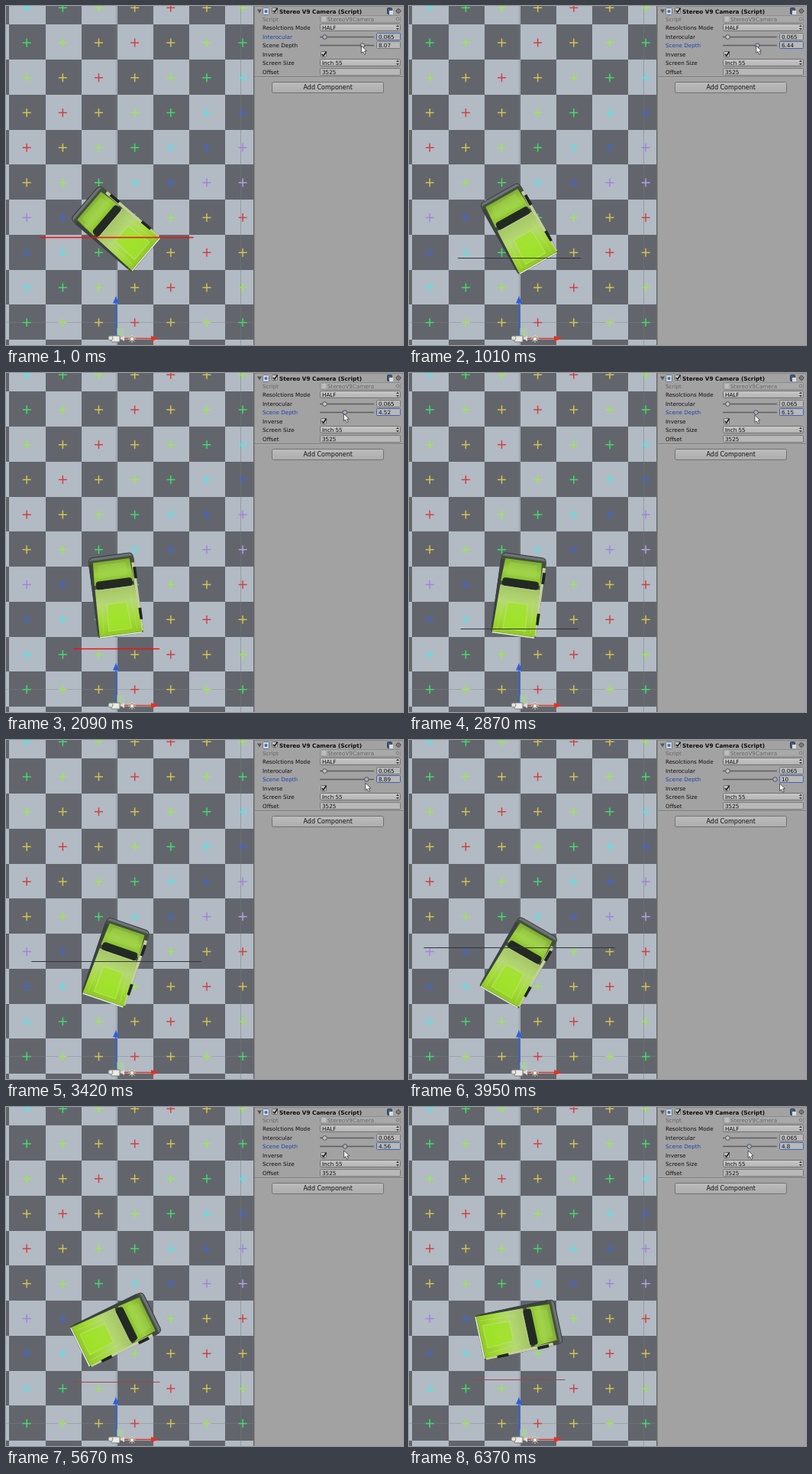
These frames come from a looping animation (520 px wide and 443 px high, 6430 ms). An HTML page with a canvas:

```html
<!DOCTYPE html>
<html lang="en">
<head>
<meta charset="utf-8">
<title>Stereo camera depth</title>
<style>
  html, body { margin: 0; width: 100%; height: 100%; overflow: hidden; background: #a2a2a2; }
  canvas { display: block; width: 520px; height: 443px; }
</style>
</head>
<body>
<canvas id="stage" width="520" height="443"></canvas>
<script>
const ctx = document.getElementById('stage').getContext('2d');
const LOOP = 6430;
const STEP = 77.68;
const FONT = '"DejaVu Sans", sans-serif';
const CROSS_COLORS = ['#d04040', '#d8c24e', '#9ae84e', '#42dc68', '#52e6e8', '#4264d2', '#a184dc', '#b4a0e6'];

// Smooth rise from 0 to 1 between two times.
function ramp(t, from, to) {
  const u = Math.min(1, Math.max(0, (t - from) / (to - from)));
  return u * u * (3 - 2 * u);
}

const depthAt = t => 8.07 - 3.55 * ramp(t, 570, 1500) + 5.48 * ramp(t, 2312, 3868)
  - 5.7 * ramp(t, 5000, 5770) + 0.5 * ramp(t, 6285, 6365);
const knobX = depth => 414.5 + 6.5 * depth;

function rect(x, y, w, h, fill) {
  ctx.fillStyle = fill;
  ctx.fillRect(x, y, w, h);
}

function line(x1, y1, x2, y2, color, width = 1) {
  ctx.strokeStyle = color;
  ctx.lineWidth = width;
  ctx.beginPath();
  ctx.moveTo(x1, y1);
  ctx.lineTo(x2, y2);
  ctx.stroke();
}

function poly(points, fill, stroke, width = 1) {
  ctx.beginPath();
  points.forEach(([x, y]) => ctx.lineTo(x, y));
  ctx.closePath();
  if (fill) { ctx.fillStyle = fill; ctx.fill(); }
  if (stroke) { ctx.strokeStyle = stroke; ctx.lineWidth = width; ctx.stroke(); }
}

// Symmetric panel between two cross sections, given as half widths.
function panel(y0, half0, y1, half1, fill, stroke) {
  poly([[-half0, y0], [half0, y0], [half1, y1], [-half1, y1]], fill, stroke);
}

function box(x, y, w, h, radius, fill, stroke) {
  ctx.beginPath();
  ctx.roundRect(x, y, w, h, radius);
  if (fill) { ctx.fillStyle = fill; ctx.fill(); }
  if (stroke) { ctx.strokeStyle = stroke; ctx.lineWidth = 1; ctx.stroke(); }
}

function disc(x, y, r, fill, stroke) {
  box(x - r, y - r, 2 * r, 2 * r, r, fill, stroke);
}

function text(str, x, y, color = '#111', size = 7.2, weight = '') {
  ctx.font = `${weight} ${size}px ${FONT}`;
  ctx.fillStyle = color;
  ctx.fillText(str, x, y);
}

function vertical(y0, y1, ...colors) {
  const g = ctx.createLinearGradient(0, y0, 0, y1);
  colors.forEach((c, i) => g.addColorStop(i / (colors.length - 1), c));
  return g;
}

function drawFloor() {
  const W = 47.15, H = 45.75;
  for (let row = -1; row < 10; row++) {
    for (let col = -1; col < 7; col++) {
      rect(Math.round(4.4 + col * W), Math.round(24.3 + row * H), 48, 46, (row + col) & 1 ? '#b2bac4' : '#62666c');
    }
  }
  line(144.5, 0, 144.5, 443, '#7e868c88');
  line(307.5, 0, 307.5, 443, '#757b8377');
  line(0, 413.5, 325, 413.5, '#7b838a66');
  for (let row = -1; row < 9; row++) {
    for (let col = 0; col < 7; col++) {
      const x = 27.2 + col * W, y = 48 + row * 45.7;
      const color = CROSS_COLORS[Math.abs(row + col - (row < 5 ? 3 : 11))];
      line(x - 5.5, y, x + 5.5, y, color, 1.5);
      line(x, y - 5.5, x, y + 5.5, color, 1.5);
    }
  }
}

function drawCar(t) {
  ctx.save();
  ctx.translate(143.8, 290.8);
  ctx.rotate((0.02 * t - 49.5) * Math.PI / 180);
  // tailgate and body shell
  box(-29, -53, 58, 14, 5, '#6b7377', '#33393c');
  box(-30, -49, 60, 102, 4, '#454f3c');
  // shaded side, then lit side with wheel arches
  rect(-30, -44, 4, 90, '#3a4140');
  rect(26, -40, 4, 90, '#c3cfa0');
  for (const y of [-34, 20]) rect(27, y, 4, 15, '#20261f');
  // cabin
  panel(-46, 24, -16, 26, vertical(-46, -16, '#7fae32', '#9cd23c', '#86be2c'));
  panel(-42, 18, -25, 20, '#a9d85a66');
  // hood
  panel(-11, 26, 51, 28, vertical(-11, 51, '#a5c466', '#b4d872', '#a4dc38', '#90ca22'));
  panel(10, 13, 45, 15, '#a0e42acc', '#c4e68aaa');
  for (const side of [-1, 1]) line(side * 19, 2, side * 22, 47, '#c0e08488');
  // windshield
  box(-24, -21, 48, 11, 4, '#232a24');
  line(-22, -9.5, 22, -9.5, '#b6cb8c');
  line(-28, 52, 28, 52, '#f0f5e8', 1.5);
  ctx.restore();
}

function drawDepthLine(t, depth) {
  const distance = 16.25 * depth, half = 0.77 * distance;
  const y = Math.round(433.5 - distance) + 0.5;
  const bright = t < 570 || (t > 1500 && t < 2312);
  const dim = t > 4950 ? '#a04446' : '#30343a';
  line(144.5 - half, y, 144.5 + half, y, bright ? '#ee1111' : dim, bright ? 1.4 : 1);
}

function drawGizmo() {
  rect(145, 421, 10, 10, '#a8d88a77');
  line(144, 434, 144, 388, '#2f62d8', 1.5);
  poly([[144, 379], [148, 388.5], [140, 388.5]], '#2e5fe0');
  line(144, 434.5, 191, 434.5, '#d83828', 1.5);
  poly([[201, 434.5], [190, 431], [190, 438]], '#e23322');
  box(138, 431, 11, 8, 1, '#ecebe2', '#77797a');
  poly([[149, 434], [155, 431], [155, 438]], '#dedfd8');
  disc(137, 434, 3, '#e4e4dc', '#8a8c8c');
  for (let i = 0; i < 4; i++) {
    const a = i * Math.PI / 4, dx = 5 * Math.cos(a), dy = 5 * Math.sin(a);
    line(165 - dx, 435 - dy, 165 + dx, 435 + dy, '#f3e9cf', 0.8);
  }
  disc(165, 435, 2.6, '#fff3dd', '#988c7c');
}

function check(x, y) {
  box(x + 0.5, y + 0.5, 7, 7, 1, '#c6c6c6', '#666');
  line(x + 2, y + 4, x + 3.7, y + 6.3, '#111', 1.5);
  line(x + 3.7, y + 6.3, x + 7.5, y + 0.5, '#111', 1.5);
}

function popup(label, y) {
  box(411.5, y + 0.5, 105, 9, 2, vertical(y, y + 9, '#c9c9c9', '#b4b4b4'), '#707070');
  text(label, 414, y + 7.7);
  for (const side of [-1, 1]) {
    poly([[511, y + 5 + side], [515, y + 5 + side], [513, y + 5 + side * 3.3]], '#333');
  }
}

function field(label, x, y, w, focused) {
  box(x + 0.5, y + 0.5, w - 1, 9, 1, '#b8b8b8', focused ? '#3f63b4' : '#777');
  text(label, x + 3, y + 7.8);
}

function slider(label, y, x, value, focused) {
  text(label, 336, y + 2.7, focused ? '#1f45ad' : '#111');
  line(411, y + 0.5, 482, y + 0.5, '#5d5d5d', 1.4);
  disc(x, y + 0.5, 2.8, focused ? '#a5b1c8' : '#c5c5c5', '#4e4e4e');
  field(value, 485, Math.floor(y - 4.5), 32, focused);
}

function drawHeader() {
  poly([[329, 4.5], [335, 4.5], [332, 9.5]], '#555');
  box(336.5, 2.5, 8, 9, 1, '#d0d5de', '#65748f');
  disc(340.5, 7, 2, '#4b6ba4');
  check(348, 2);
  text('Stereo V9 Camera (Script)', 358, 9.7, '#0d0d0d', 7.3, 'bold');
  box(499.5, 2.5, 6, 8, 1, '#465a78', '#303d50');
  rect(502, 6, 5, 5, '#d6dce4');
  disc(514, 6.5, 2.6, '#a2a2a2', '#444');
  line(510, 6.5, 518, 6.5, '#44444488');
  line(514, 2.5, 514, 10.5, '#44444488');
}

function drawInspector(t, depth) {
  rect(324, 0, 196, 443, '#a2a2a2');
  rect(324, 0, 1.5, 443, '#686868');
  rect(326, 0, 194, 1, '#858585');
  drawHeader();

  text('Script', 336, 20, '#666');
  box(411.5, 12.5, 105, 9, 1, '#a9a9a9', '#8c8c8c');
  rect(414, 14, 5, 6, '#b9bec5');
  text('StereoV9Camera', 421, 20, '#666');
  disc(513, 17, 2, null, '#7c7c7c');

  text('Resolctions Mode', 336, 31.3);
  popup('HALF', 23);
  const depthFocused = t > 400;
  slider('Interocular', 40, 417.5, '0.065', !depthFocused);
  slider('Scene Depth', 51, knobX(depth), String(+depth.toFixed(2)), depthFocused);
  text('Inverse', 336, 66);
  check(412, 59);
  text('Screen Size', 336, 77.3);
  popup('Inch 55', 69);
  text('Offset', 336, 88.6);
  field('3525', 411, 81, 106);

  rect(326, 92, 194, 1, '#7b7b7b');
  rect(326, 93, 194, 1, '#b0b0b0');
  box(348.5, 99.5, 146, 14, 2, vertical(99, 113, '#bdbdbd', '#adadad'), '#717171');
  text('Add Component', 389.5, 109.3, '#111', 8);
}

function drawCursor(t, depth) {
  // The pointer overshoots while the slider sits at its end.
  const overshoot = 7.5 * (ramp(t, 3500, 3868) - ramp(t, 5000, 5300));
  ctx.save();
  ctx.translate(knobX(depth) - 1.5 + overshoot, 52 + 5 * ramp(t, 1010, 4200));
  poly([[0, 0], [0, 9.5], [2.2, 7.5], [4, 11.3], [5.8, 10.4], [4.1, 6.9], [7, 6.7]], '#fff', '#333', 0.8);
  ctx.restore();
}

function draw(elapsed) {
  const t = STEP * Math.floor((elapsed % LOOP + 12) / STEP);
  const depth = depthAt(t);
  drawFloor();
  drawCar(t);
  drawDepthLine(t, depth);
  drawGizmo();
  drawInspector(t, depth);
  drawCursor(t, depth);
}

const start = performance.now();
function tick() {
  draw(performance.now() - start);
  requestAnimationFrame(tick);
}
tick();
</script>
</body>
</html>
```
